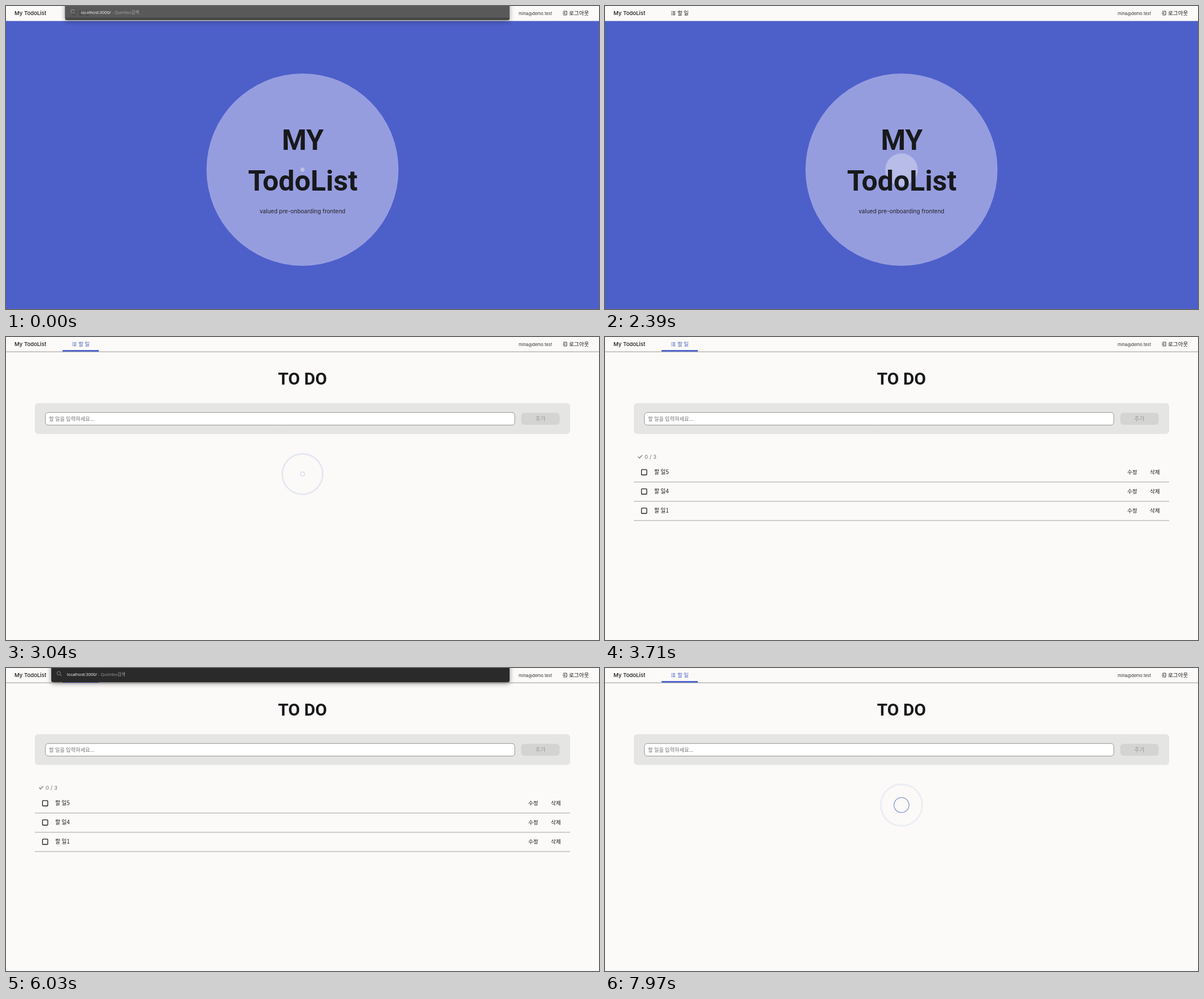
These frames come from a looping animation (1048x535 px, 8000 ms). An HTML page with a canvas:

```html
<!DOCTYPE html>
<html lang="ko">
<head>
<meta charset="utf-8">
<title>My TodoList</title>
<style>
html, body { margin: 0; width: 100%; height: 100%; overflow: hidden; background: #fbfaf8; }
canvas { display: block; width: 1048px; height: 535px; }
</style>
</head>
<body>
<canvas id="stage" width="1048" height="535"></canvas>
<script>
const page = document.getElementById('stage').getContext('2d');
const layer = document.createElement('canvas');
layer.width = 1048;
layer.height = 60;
const overlay = layer.getContext('2d');
let ctx = page;

const LOOP = 8000;
const PAPER = '#fbfaf8', BLUE = '#4d5fc9', INK = '#18191b', RULE = '#979795';
const UI = 'Inter, "Noto Sans CJK KR", "Noto Sans CJK", sans-serif';
const KR = '"Noto Sans CJK KR", "Noto Sans CJK", sans-serif';
const HEAD = 'Roboto, sans-serif';
const BAR = '"Open Sans", "Noto Sans CJK KR", "Noto Sans CJK", sans-serif';

// Solves a CSS cubic-bezier curve for progress p.
function bezier(x1, y1, x2, y2) {
  const at = (a, b, u) => 3 * a * u * (1 - u) ** 2 + 3 * b * u * u * (1 - u) + u ** 3;
  return p => {
    if (p <= 0) return 0;
    if (p >= 1) return 1;
    let lo = 0, hi = 1;
    for (let i = 0; i < 24; i++) {
      const mid = (lo + hi) / 2;
      if (at(x1, x2, mid) < p) lo = mid; else hi = mid;
    }
    return at(y1, y2, lo);
  };
}
const ease = bezier(0.25, 0.1, 0.25, 1);
const puffScale = bezier(0.165, 0.84, 0.44, 1);
const puffFade = bezier(0.3, 0.61, 0.355, 1);

// Last value whose start time has been reached.
function step(t, keys) {
  let value = keys[0][1];
  for (const [start, v] of keys) if (t >= start) value = v;
  return value;
}

function text(str, x, y, size, font, color = INK, weight = 400, align = 'left') {
  ctx.font = `${weight} ${size}px ${font}`;
  ctx.fillStyle = color;
  ctx.textAlign = align;
  ctx.fillText(str, x, y);
  return ctx.measureText(str).width;
}

function rect(x, y, w, h, fill) {
  ctx.fillStyle = fill;
  ctx.fillRect(x, y, w, h);
}

function box(x, y, w, h, r, fill, stroke, line = 1) {
  ctx.beginPath();
  ctx.roundRect(x, y, w, h, r);
  if (fill) { ctx.fillStyle = fill; ctx.fill(); }
  if (stroke) { ctx.strokeStyle = stroke; ctx.lineWidth = line; ctx.stroke(); }
}

function disc(x, y, r, fill) {
  ctx.beginPath();
  ctx.arc(x, y, r, 0, 7);
  ctx.fillStyle = fill;
  ctx.fill();
}

function ring(x, y, r, color, width) {
  ctx.beginPath();
  ctx.arc(x, y, r, 0, 7);
  ctx.strokeStyle = color;
  ctx.lineWidth = width;
  ctx.stroke();
}

function path(points, color, width = 1) {
  ctx.beginPath();
  points.forEach(([x, y], i) => i ? ctx.lineTo(x, y) : ctx.moveTo(x, y));
  ctx.strokeStyle = color;
  ctx.lineWidth = width;
  ctx.stroke();
}

function header(active) {
  rect(0, 0, 1048, 26.5, PAPER);
  text('My TodoList', 15, 16.3, 9.6, UI, INK, 500);

  const tab = active ? BLUE : INK;
  for (const y of [9.5, 12.2, 14.9]) {
    rect(117, y, 1.3, 1.1, tab);
    rect(119.4, y, 4.8, 1.1, tab);
  }
  text('할 일', 128, 16.2, 9.6, KR, tab);
  text('mina@demo.test', 935.5, 15.5, 7.4, UI, '#333', 400, 'center');

  path([[985.5, 10.6], [985.5, 9.2], [991, 9.2], [991, 15.8], [985.5, 15.8], [985.5, 14.4]], INK, 0.9);
  path([[984, 12.5], [988.3, 12.5]], INK, 0.9);
  path([[987.2, 11.3], [988.4, 12.5], [987.2, 13.7]], INK, 0.8);
  text('로그아웃', 995, 16.2, 9.6, KR);

  if (active) {
    rect(0, 25.6, 1048, 1, RULE);
    rect(100, 23, 64, 2.8, BLUE);
  }
}

function home(t) {
  rect(0, 0, 1048, 535, BLUE);
  disc(524, 289, 169.7, '#969ddf');
  const start = t < 2220 ? -45 : 2225;
  const grow = ease((t - start) / 740);
  disc(524, 289, 82 * grow, `rgba(251,250,248,${0.4 - 0.22 * grow})`);
  text('MY', 524.5, 253.5, 50, HEAD, INK, 700, 'center');
  text('TodoList', 524.5, 326, 50, HEAD, INK, 700, 'center');
  text('valued pre-onboarding frontend', 524, 365.5, 10, UI, '#222', 400, 'center');
  header(false);
}

function spinner(ms) {
  for (const delay of [0, 1000]) {
    const p = (ms + delay) % 2000 / 2000;
    const s = puffScale(p);
    ctx.globalAlpha = 1 - puffFade(p);
    ring(524, 242, 38.6 * s, BLUE, 3 * s);
  }
  ctx.globalAlpha = 1;
}

function list() {
  path([[58.5, 211.2], [61, 213.8], [65.8, 208.6]], '#666', 1.2);
  text('0 / 3', 70, 214.6, 9.6, UI, '#777');
  ['할 일5', '할 일4', '할 일1'].forEach((name, i) => {
    const y = 239 + i * 34;
    box(64.5, y - 4.8, 9.3, 9.3, 1, null, INK, 1.3);
    text(name, 87, y + 3.4, 9.8, KR);
    text('수정', 923, y + 3.4, 9.6, KR);
    text('삭제', 963, y + 3.4, 9.6, KR);
    rect(51, y + 16.6, 946, 0.9, RULE);
  });
}

function todo(t) {
  rect(0, 0, 1048, 535, PAPER);
  header(true);
  text('TO DO', 524, 83.5, 30, HEAD, INK, 700, 'center');
  box(51, 116.7, 946, 54.6, 6, '#e5e5e3');
  box(69.7, 133.3, 829.4, 22.2, 5, '#fff', '#8c8c8a', 0.9);
  text('할 일을 입력하세요...', 76, 147.8, 9.3, KR, '#757575');
  box(910.5, 133.8, 68, 21.2, 6, '#d4d4d2');
  text('추가', 944.5, 147.8, 9.8, KR, '#9a9a98', 400, 'center');
  if (t < 3710) spinner(t - 3000);
  else if (t >= 7820) spinner(t - 7800);
  else list();
}

function addressBar(x, typed, lit) {
  ctx.clearRect(0, 0, 1048, 60);
  ctx.save();
  ctx.shadowColor = 'rgba(0,0,0,0.45)';
  ctx.shadowBlur = 9;
  ctx.shadowOffsetY = 2;
  box(x, -20, 890 - x, 45, 3, '#2a2a2a');
  ctx.restore();
  if (lit) rect(x, 0, 890 - x, 20.5, '#3f3f3f');
  ring(x + 13.3, 9.3, 3.1, '#9a9a9a', 0.8);
  path([[x + 15.6, 11.6], [x + 18.8, 14.7]], '#9a9a9a', 0.9);
  const w = text('localhost:3000/' + typed, x + 27.7, 13.6, 7.5, BAR, '#fff', 500);
  text(' - Quimbo검색', x + 27.7 + w, 13.6, 7.7, BAR, '#a0a0a0');
}

function showBar(t) {
  const alpha = step(t, [[0, 0.86], [30, 1], [2220, 0.6], [2250, 0.15], [2280, 0],
    [5300, 0.14], [5330, 0.86], [5360, 1], [7610, 0.6], [7640, 0.15], [7670, 0]]);
  if (!alpha) return;
  const typed = step(t, [[0, ''], [450, 's'], [600, 'si'], [1610, 'sig'], [1700, 'signi'],
    [1760, 'signin'], [4000, ''], [6460, 's'], [6490, 'si'], [6650, 'sig'], [6820, 'sign'],
    [7070, 'signu'], [7200, 'signup']]);
  const second = t > 4000;

  // Painted opaque on its own layer so that it fades as one piece.
  ctx = overlay;
  addressBar(second ? 80 : 104.5, typed, second ? t < 6030 : t < 450);
  ctx = page;
  ctx.globalAlpha = alpha;
  ctx.drawImage(layer, 0, 0);
  ctx.globalAlpha = 1;
}

function draw() {
  const t = performance.now() % LOOP;
  if (t < 3010) home(t); else todo(t);
  showBar(t);
  requestAnimationFrame(draw);
}
draw();
</script>
</body>
</html>
```
